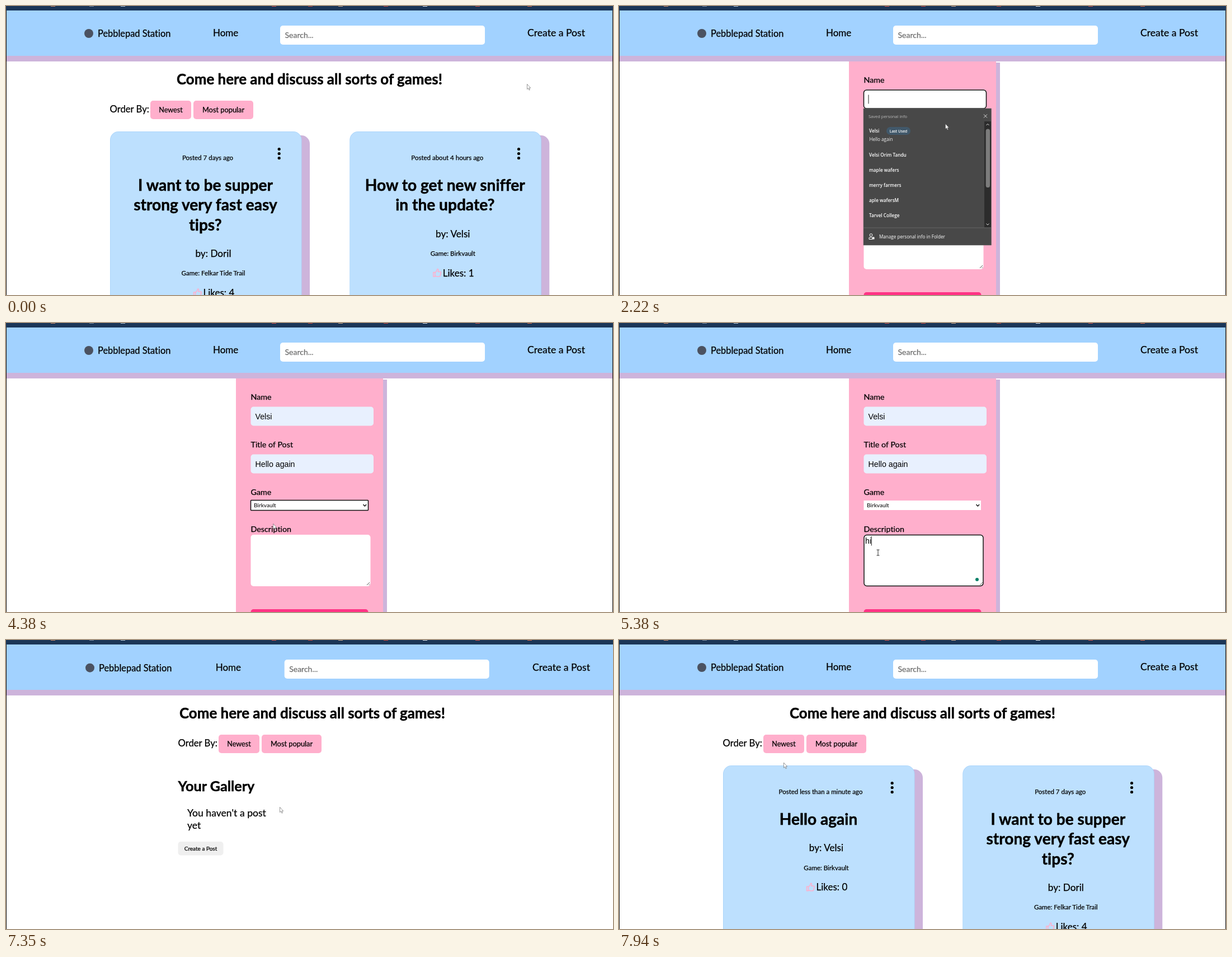
An HTML page that plays this animation: 1085 px wide and 516 px high, repeating every 8 s.

```html
<!DOCTYPE html>
<html lang="en">
<head>
<meta charset="utf-8">
<title>Forum walkthrough</title>
<style>
  html, body { margin: 0; width: 100%; height: 100%; overflow: hidden; background: #fff; }
  svg { display: block; width: 1085px; height: 516px; font-family: Lato, "Open Sans", sans-serif; }
  text { font-variant-ligatures: none; }
  .round { stroke-width: .25; stroke-linejoin: round; }
  .bold { font-weight: 700; stroke-width: .45; }
  .mid { text-anchor: middle; }
  .field { font-family: "Liberation Sans", Arial, sans-serif; font-size: 14.2px; }
  .popup { font-family: "Open Sans", "Noto Sans", sans-serif; }
  .popup .round { stroke-width: 0; }
  .semi { font-weight: 600; }
</style>
</head>
<body>
<svg id="stage" viewBox="0 0 1085 516"></svg>
<script>
const LOOP = 8000;
const BLUE = '#a2d2ff', SKY = '#bde0fe', LILAC = '#cdb4db', PINK = '#ffafcc', HOT = '#ff3385';
const FILLED = '#e8f0fe';

// Drawing helpers
const text = (x, y, s, size, cls = '', fill = '#000') =>
  `<text x="${x}" y="${y}" font-size="${size}" class="round ${cls}" fill="${fill}" stroke="${fill}">${s}</text>`;
const rect = (x, y, w, h, fill, r = 0, extra = '') =>
  `<rect x="${x}" y="${y}" width="${w}" height="${h}" rx="${r}" fill="${fill}" ${extra}/>`;
const line = (d, color, w = 1) =>
  `<path d="${d}" fill="none" stroke="${color}" stroke-width="${w}"/>`;
const group = (id, body) => `<g id="${id}">${body}</g>`;
const ring = (id, x, y, w, h, r = 5) =>
  rect(x, y, w, h, 'none', r, `id="${id}" stroke="#111" stroke-width="1.5"`);

function browserBar() {
  const tabs = [[84, '#c98a6a'], [153, '#7d8ea3'], [209, '#b9cbd8'], [479, '#d0524e'], [544, '#c4453f'],
    [598, '#c9a98e'], [679, '#c4453f'], [749, '#dfe6ee'], [843, '#d0524e'], [936, '#d9694a']];
  return rect(0, 0, 1085, 8, '#1b3657') + tabs.map(([x, c]) => rect(x - 4, 0, 8, 1, c)).join('');
}

function nav(logo, home, search, create, dy) {
  return `<circle cx="${logo}" cy="${49 + dy}" r="8" fill="#4b5261"/>` +
    text(logo + 16, 55 + dy, 'Pebblepad Station', 16.4) +
    text(home, 54 + dy, 'Home', 17) +
    rect(search, 35, 366, 34, '#fff', 5) +
    text(search + 8.5, 57, 'Search...', 14, '', '#6d6d6d') +
    text(create, 54 + dy, 'Create a Post', 17.6);
}

function intro(headX, x) {
  return text(headX, 140, 'Come here and discuss all sorts of games!', 25.9, 'bold mid') +
    text(x, 190, 'Order By:', 16.7) +
    rect(x + 72.5, 169, 73, 33, PINK, 5) + text(x + 109, 189.5, 'Newest', 12.6, 'mid') +
    rect(x + 149.5, 169, 107, 33, PINK, 5) + text(x + 203, 189.5, 'Most popular', 12.8, 'mid');
}

const thumb = (x, y) => `<path transform="translate(${x} ${y})" fill="none" stroke="${PINK}" stroke-width="1.5"
  stroke-linejoin="round" d="M1 7h3v7.5H1zM4 8L7 4.5C7.6 3.4 7.2 1 8.6 1C10.6 1 10.2 4 9.4 6h4.2
  c1.6 0 1.6 2 .4 2.3c.9.6.6 1.9-.4 2.1c.7.7.3 1.8-.5 2c.4 1-.2 2.1-1.4 2.1H7.6L4 13.2"/>`;

function card(x, post) {
  const y = 342 + 35.3 * post.title.length, mid = x + 185;
  const dots = [255.5, 263.5, 271.5]
    .map(cy => `<circle cx="${x + 302.7}" cy="${cy}" r="2.6"/>`).join('');
  return rect(x + 14.5, 231, 343, 400, LILAC, 15) +
    rect(x + .5, 224, 342.5, 400, '#a9d3fa', 15) + rect(x + 1.3, 224.8, 340.9, 400, SKY, 14.2) + dots +
    text(x + 175, 275, `Posted ${post.when} ago`, 11.5, 'mid') +
    post.title.map((s, i) => text(x + 171, 330 + 35.3 * i, s, 28.1, 'bold mid')).join('') +
    text(mid, y, `by: ${post.by}`, 17.2, 'mid') +
    text(mid, y + 33.5, `Game: ${post.game}`, 11.5, 'mid') +
    thumb(x + 149, y + 56) + text(x + 167, y + 70, `Likes: ${post.likes}`, 17);
}

const tips = { when: '7 days', title: ['I want to be supper', 'strong very fast easy', 'tips?'],
  by: 'Doril', game: 'Felkar Tide Trail', likes: 4 };
const sniffer = { when: 'about 4 hours', title: ['How to get new sniffer', 'in the update?'],
  by: 'Velsi', game: 'Birkvault', likes: 1 };
const hello = { when: 'less than a minute', title: ['Hello again'], by: 'Velsi', game: 'Birkvault', likes: 0 };

const home = (a, b) => intro(542.5, 185.5) + card(185.5, a) + card(613.8, b);

const gallery = intro(547.5, 307.5) +
  text(307.5, 270, 'Your Gallery', 25.2, 'bold') +
  text(324, 315, "You haven't a post", 17.6) + text(324, 337, 'yet', 17.6) +
  rect(307.5, 360, 81, 24.5, '#efefef', 5) + text(348, 375.5, 'Create a Post', 10, 'mid');

function form() {
  const label = (y, s) => text(437.5, y, s, 14.3);
  const input = (id, y, value) => rect(437.5, y, 219.5, 34, '#fff', 5, `id="${id}Box"`) +
    `<text id="${id}Text" class="field" x="445.5" y="${y + 22}">${value}</text>`;
  return rect(418.5, 101, 262.5, 479, LILAC) + rect(411, 94, 263, 479, PINK) +
    label(137, 'Name') + input('name', 149.5, 'Velsi') + ring('nameRing', 437.5, 150, 219, 33) +
    rect(445.5, 158.5, 1, 16, '#222', 0, 'id="nameCaret"') +
    label(222, 'Title of Post') + input('title', 234.5, 'Hello again') +
    label(307, 'Game') + rect(437.5, 317, 209.5, 17, '#fff') +
    '<text id="choice" x="443" y="328.8" font-size="10.2"></text>' +
    line('M638.5 324l2.8 3 2.8-3', '#111', 1.5) + ring('gameRing', 437.5, 316.5, 210, 18, 1) +
    label(373, 'Description') + rect(437.5, 378, 214, 92, '#fff', 5) +
    line('M645 468l5-5M648.5 468l1.5-1.5', '#555') + ring('descRing', 438, 378.5, 213, 91) +
    '<text id="desc" class="field" x="440" y="393.5"></text>' +
    rect(439.2, 381, 1, 16.5, '#222', 0, 'id="descCaret"') +
    '<circle id="dot" cx="640" cy="458" r="3"/>' +
    rect(437.5, 511, 210, 35.5, HOT, 5, 'id="submit"') + text(543.5, 533.5, 'Submit', 14.8, 'mid', '#fff');
}

function savedInfo() {
  const people = ['Velsi Orim Tandu', 'maple wafers', 'merry farmers', 'aple wafersM', 'Tarvel College'];
  const item = (y, s) => text(447, y, s, 8.2, 'semi', '#fff');
  return '<g class="popup">' +
    rect(437, 183, 228.5, 244, '#484848', 0, 'stroke="#666" stroke-width=".6"') +
    text(446, 199.5, 'Saved personal info', 7.5, '', '#bdbdbd') +
    line('M652 193.5l6 6M658 193.5l-6 6', '#ddd') +
    rect(437.5, 211, 215.5, 36, '#5c5c5c', 0, 'id="personHover"') +
    item(226, 'Velsi') + rect(478, 216, 43, 14, '#41586a', 7) +
    text(499.5, 225.6, 'Last Used', 6.7, 'semi mid', '#fff') +
    text(447.5, 240.5, 'Hello again', 8.1, '', '#f2f2f2') +
    people.map((s, i) => item(268.5 + 27 * i, s)).join('') +
    rect(653, 206, 12, 189.5, '#2c2c2c') + rect(655.7, 219.5, 7.3, 104.5, '#7c7c7c', 3.6) +
    line('M656.5 213l2.5-2.5 2.5 2.5M656.5 388.5l2.5 2.5 2.5-2.5', '#ddd') +
    line('M437 396H665', '#656565') +
    '<circle cx="450.5" cy="409" r="2.4" fill="none" stroke="#fff"/>' +
    line('M453 416.5h-6v-2.5q0-1 1-1h4', '#fff') + rect(452.5, 412.5, 4, 4, '#fff', .5) +
    text(465, 415, 'Manage personal info in Folder', 8.15, '', '#fff') + '</g>';
}

const games = ['Select a game', 'Birkvault', 'Zibbok', 'Plorin', 'Lumiden Breach', 'Rusty Cart Alley', 'Felkar Tide Trail'];
const rowY = i => 337.2 + 12.5 * i;
const gameList = rect(438, 337, 209, 88.5, '#fff', 4, 'stroke="#555" stroke-width=".8"') +
  rect(438.3, 337.2, 208.4, 12.4, '#767676', 0, 'id="rowHover"') +
  games.map((s, i) => `<text class="row" x="443.5" y="${rowY(i) + 9.3}" font-size="10.2">${s}</text>`).join('');

// Pointer shapes, each with its hot spot at 0,0
const pointer =
  '<path id="arrow" d="M.5 .5V9.6L2.5 7.8L4 11.2L5.4 10.6L4 7.3H6.7Z" fill="#fff" stroke="#555" stroke-width=".6"/>' +
  `<g id="beam">${line('M-2.5-5h5M0-5V5M-2.5 5h5', '#333')}</g>` +
  '<path id="hand" d="M-1 1Q0-1 1 1V5L5 6Q6 6 6 8L5 13H-1L-4 8.5Q-4 7-2.5 7.5L-1 9Z" fill="#fff" stroke="#222" stroke-width=".8"/>';

const svg = document.getElementById('stage');
svg.innerHTML = rect(0, 0, 1085, 516, '#fff') +
  group('homeBefore', home(tips, sniffer)) + group('homeAfter', home(hello, tips)) +
  group('gallery', gallery) + group('form', form()) +
  rect(0, 8, 1085, 81, BLUE) + rect(0, 89, 1085, 10, LILAC) +
  group('nav', nav(148, 370, 490, 932, 0)) + group('navWide', nav(150, 374.7, 497.7, 941, .7)) +
  browserBar() + rect(0, 8, 1, 508, '#111') + rect(1084, 8, 1, 508, '#111', 0, 'id="edge"') +
  group('savedInfo', savedInfo()) + group('gameList', gameList) + group('pointer', pointer);

const el = {};
svg.querySelectorAll('[id]').forEach(n => el[n.id] = n);
const rows = [...svg.querySelectorAll('.row')];
const show = (id, on) => { el[id].style.display = on ? '' : 'none'; };
const fill = (id, color) => el[id].setAttribute('fill', color);

// Pointer moves: start, end, steps, x, y, shape on arrival
const moves = [
  [460, 720, 5, 994, 54, 'hand'],
  [1330, 1400, 2, 625, 166, 'beam'],
  [2080, 2220, 3, 583, 210, 'arrow'],
  [2290, 2490, 4, 505, 228, 'arrow'],
  [2830, 3250, 7, 489, 326, 'arrow'],
  [3580, 3580, 1, 489, 333, 'arrow'],
  [3650, 4060, 7, 478, 355, 'arrow'],
  [4330, 4780, 7, 463, 410, 'beam'],
  [5910, 5910, 1, 462, 409, 'arrow'],
  [6180, 6660, 8, 500, 454, 'hand'],
  [6800, 7080, 5, 489, 298, 'arrow'],
  [7870, 7940, 2, 294, 218.5, 'arrow']
];

// Share of a stepped move that is done at time t
function stepped(t, start, end, n) {
  if (t < start) return 0;
  if (t >= end) return 1;
  return (Math.floor((t - start) / (end - start) * (n - 1) + 1e-6) + 1) / n;
}
const ease = p => p * p * (3 - 2 * p);

function pointerAt(t) {
  let x = 931, y = 139, shape = 'arrow';
  for (const [start, end, n, tx, ty, arrival] of moves) {
    if (t < start) break;
    const p = stepped(t, start, end, n), k = ease(p);
    x += (tx - x) * k;
    y += (ty - y) * k;
    shape = p === 1 ? arrival : 'arrow';
  }
  return { x, y, shape };
}

function render(t) {
  const during = (a, b) => t >= a && t < b;
  const p = pointerAt(t);

  show('homeBefore', t < 990);
  show('form', during(990, 7350));
  show('gallery', during(7350, 7540));
  show('homeAfter', t >= 7540);
  const wide = during(7350, 7540);
  show('nav', !wide);
  show('navWide', wide);
  show('edge', !wide);

  const scroll = 74 * ease(stepped(t, 5910, 6110, 4));
  el.form.setAttribute('transform', `translate(0 ${-scroll})`);

  // Name and title
  const preview = t >= 2420, filled = t >= 2560;
  show('nameRing', during(1670, 3250));
  show('nameCaret', during(1670, 2420));
  show('nameText', preview);
  show('titleText', filled);
  fill('nameBox', preview ? FILLED : '#fff');
  fill('titleBox', filled ? FILLED : '#fff');
  show('savedInfo', during(1740, 2560));
  show('personHover', during(2290, 2560));

  // Game
  const row = Math.max(0, Math.floor((p.y - 337.2) / 12.5));
  show('gameList', during(3320, 4130));
  el.rowHover.setAttribute('y', rowY(row));
  rows.forEach((r, i) => r.setAttribute('fill', i === row ? '#fff' : '#000'));
  el.choice.textContent = games[t >= 4130 ? 1 : 0];
  show('gameRing', during(4130, 4850));

  // Description
  const typed = t < 5330 ? 0 : t < 5380 ? 1 : 2;
  el.desc.textContent = 'hi'.slice(0, typed);
  show('descRing', during(4850, 6730));
  show('descCaret', during(4850, 5120) || during(5330, 5910));
  el.descCaret.setAttribute('x', [439.2, 448.2, 450.8][typed]);
  show('dot', typed === 2);
  fill('dot', t < 5980 ? '#0b8068' : '#17608a');
  fill('submit', during(6590, 6870) ? '#e82a76' : HOT);

  el.pointer.setAttribute('transform', `translate(${p.x} ${p.y})`);
  for (const s of ['arrow', 'beam', 'hand']) show(s, s === p.shape);
}

const begin = performance.now();
function tick() {
  render((performance.now() - begin) % LOOP);
  requestAnimationFrame(tick);
}
tick();
</script>
</body>
</html>
```
